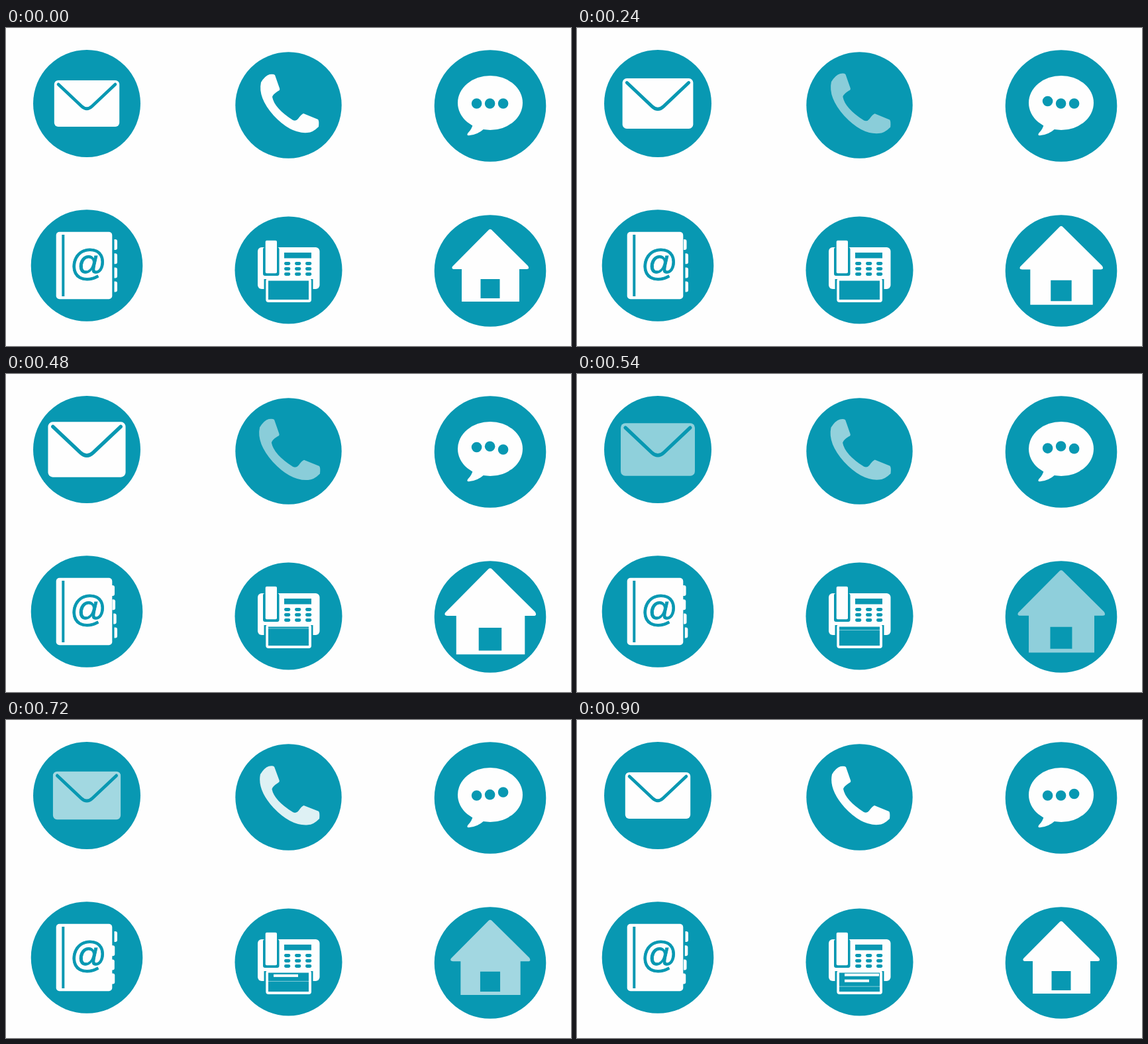
Animation, 853 px wide and 480 px high, one loop 0.96 s. Source, as an HTML page:

```html
<!DOCTYPE html>
<html lang="en">
<head>
<meta charset="utf-8">
<title>Contact icons</title>
<style>
  html, body { margin: 0; width: 100%; height: 100%; overflow: hidden; background: #fefefe; }
  svg { display: block; width: 853px; height: 480px; fill: #fefefe; }
  .teal { fill: #0898b2; }
  .line { fill: none; stroke: #0898b2; stroke-width: 4.6; stroke-linecap: round; }
  .at { font: 55px "Liberation Sans", Arial, sans-serif; text-anchor: middle; stroke: #0898b2; stroke-width: .9; }
</style>
</head>
<body>
<svg viewBox="0 0 853 480">
  <defs><clipPath id="slot"><rect x="396" y="381.5" width="61" height="28.5"/></clipPath></defs>
  <g class="teal">
    <circle cx="122" cy="114" r="81"/>
    <circle cx="426.5" cy="116.5" r="80.2"/>
    <circle cx="731" cy="117.5" r="84.3"/>
    <circle cx="122" cy="358.5" r="84.3"/>
    <circle cx="426.5" cy="365.5" r="81"/>
    <circle cx="731" cy="366.5" r="84.3"/>
  </g>

  <g id="mail">
    <rect x="72.8" y="79" width="98.4" height="70" rx="6"/>
    <path class="line" d="M79 85L114 118Q122 125.5 130 118L165 85"/>
  </g>

  <path id="phone" d="M385 82Q391 72 398 70Q404 69 406 71L413 91Q414 94 411 95Q403 100 402 104Q405 121 433 139Q438 141 441 137Q446 130 449 129L471 138Q473 140 472 149Q463 158 455 158Q430 160 404 132Q380 105 385 82Z"/>

  <ellipse cx="731" cy="113" rx="49" ry="41"/>
  <path d="M705 144Q704 152 697 159Q695 163 700 162Q712 161 722 152Z"/>
  <g id="dots" class="teal"></g>

  <rect x="75.7" y="307.7" width="84.6" height="101.6" rx="5"/>
  <rect class="teal" x="84.3" y="312" width="4" height="93"/>
  <text class="teal at" x="124.5" y="372.5">@</text>
  <g id="tabs"></g>

  <rect x="380" y="331" width="93.5" height="63" rx="6"/>
  <rect class="teal" x="388" y="331" width="24.5" height="43" rx="3"/>
  <rect x="391.7" y="320.7" width="17.3" height="49.5" rx="2"/>
  <rect class="teal" x="420" y="339" width="41" height="8.5"/>
  <g id="keys" class="teal"></g>
  <path class="teal" d="M389.5 379H463.5V400H389.5Z"/>
  <rect x="392.3" y="378" width="68.7" height="36" rx="4"/>
  <rect class="teal" x="396" y="381.5" width="61" height="28.5"/>
  <g clip-path="url(#slot)">
    <g id="paper">
      <rect x="396" y="-1" width="61" height="1" opacity=".5"/>
      <rect x="404" y="-11" width="37" height="4"/>
      <rect x="404" y="-20" width="52" height="4"/>
    </g>
  </g>

  <path id="house" fill-rule="evenodd" d="M728.5 305Q731 302.5 733.5 305L788 359Q791 364 786 364H775V413H688V364H677Q672 364 674 360ZM716.5 379V408H745.5V379Z"/>
</svg>
<script>
const $ = id => document.getElementById(id);
const STEP = 60, STEPS = 16;

function add(parent, name, attrs) {
  const el = document.createElementNS("http://www.w3.org/2000/svg", name);
  for (const key in attrs) el.setAttribute(key, attrs[key]);
  return $(parent).appendChild(el);
}

for (let row = 0; row < 3; row++)
  for (let col = 0; col < 3; col++)
    add("keys", "rect", { x: 420 + col * 16, y: 353 + row * 8, width: 9.3, height: 5, rx: 2.4 });

const dots = [6, 8.7, 12.3].map((peak, i) =>
  ({ peak, el: add("dots", "circle", { cx: 710.6 + i * 20, cy: 114, r: 7.8 }) }));

const tabs = [7, 10.5, 12, 13.5].map((peak, i) => {
  const y = 319 + i * 21.2;
  return { peak, el: add("tabs", "path", { d: `M163.5 ${y}h1.5q3 0 3 3v10q0 3 -3 3h-1.5z` }) };
});

// Piecewise-linear value through [step, value] pairs
function track(keys, n) {
  if (n <= keys[0][0]) return keys[0][1];
  for (let i = 1; i < keys.length; i++) {
    const [a, from] = keys[i - 1], [b, to] = keys[i];
    if (n <= b) return from + (to - from) * (n - a) / (b - a);
  }
  return keys[keys.length - 1][1];
}

const bump = (n, peak, half) =>
  Math.abs(n - peak) < half ? Math.cos((n - peak) / half * Math.PI / 2) : 0;

const grow = [[2, 1], [4, 1.085], [6, 1.17], [7, 1.2], [8, 1.19], [10, 1.085], [13, 1.015], [15, 1]];
const growFade = [[8, 1], [9, .55], [10, .58], [13, .65], [14, .8], [15, 1]];
const pulse = [[0, 1], [4, 1.025], [8, 1.045], [10, 1.025], [13, 1.01], [15, 1]];
const pulseFade = [[2, 1], [3, .75], [4, .53], [8, .53], [10, .61], [13, 1]];

function pose(id, x, y, scale, opacity, angle = 0) {
  $(id).setAttribute("transform",
    `translate(${x} ${y}) rotate(${angle}) scale(${scale}) translate(${-x} ${-y})`);
  $(id).setAttribute("opacity", opacity);
}

function draw(now) {
  const n = Math.floor(now / STEP) % STEPS;
  const size = track(grow, n), fade = track(growFade, n);
  pose("mail", 122, 114, size, fade);
  pose("house", 731.3, 358.5, size, fade);
  pose("phone", 428, 114.5, track(pulse, n), track(pulseFade, n), -bump(n, 13, 2));
  for (const { el, peak } of dots)
    el.setAttribute("transform", `translate(0 ${-5 * bump(n, peak, 4)})`);
  for (const { el, peak } of tabs)
    el.setAttribute("transform", `translate(${-4.2 * bump(n, peak, 5)} 0)`);
  $("paper").setAttribute("transform", `translate(0 ${n < 7 ? 380 : 384.5 + (n - 8) * 2.6})`);
  requestAnimationFrame(draw);
}
requestAnimationFrame(draw);
</script>
</body>
</html>
```
